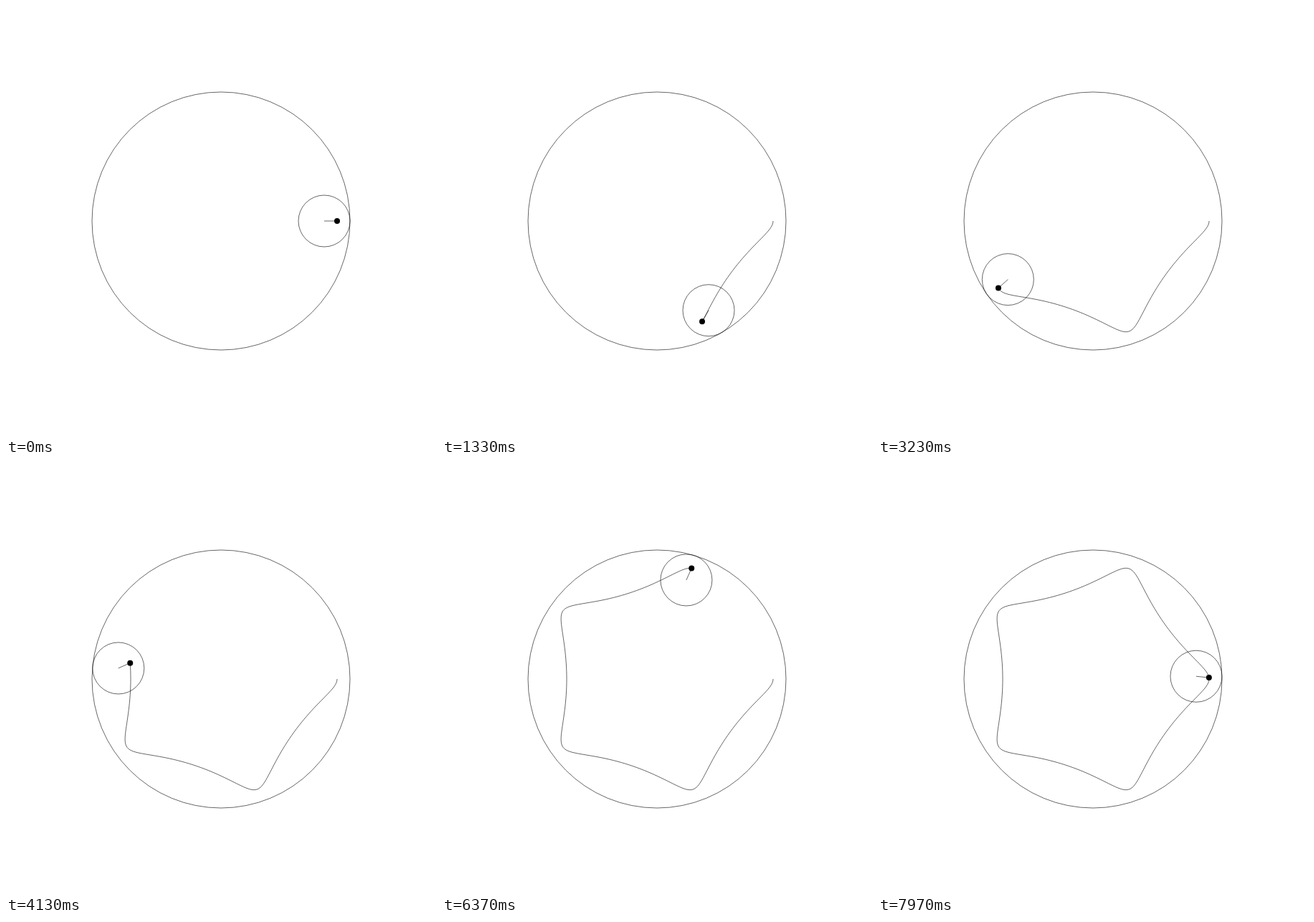
Recreate the animation shown at these times as an HTML page. Size 600 px wide and 600 px high, loop 8.01 s.

```html
<!DOCTYPE html>
<html lang="en">
<head>
<meta charset="utf-8">
<title>Hypotrochoid</title>
<style>
  html, body { margin: 0; width: 100%; height: 100%; overflow: hidden; background: #fff; }
  svg { display: block; width: 100%; height: 100%; }
  .line { fill: none; stroke: #000; stroke-width: 0.6; }
</style>
</head>
<body>
<svg viewBox="0 0 600 600">
  <circle class="line" cx="300" cy="300" r="180"/>
  <path class="line" id="trail"/>
  <circle class="line" id="wheel" r="36"/>
  <line class="line" id="arm"/>
  <circle id="pen" r="4"/>
</svg>
<script>
const LOOP = 8010, STEPS = 240;
const CENTER = 300, OUTER = 180, INNER = 36, ARM = 18;
const ORBIT = OUTER - INNER, SPIN = ORBIT / INNER;
const [trail, wheel, arm, pen] = ['trail', 'wheel', 'arm', 'pen'].map(id => document.getElementById(id));

const set = (el, attrs) => Object.entries(attrs).forEach(([k, v]) => el.setAttribute(k, v));

function pose(step) {
  const a = step / STEPS * 2 * Math.PI;
  const x = CENTER + ORBIT * Math.cos(a), y = CENTER + ORBIT * Math.sin(a);
  return { x, y, px: x + ARM * Math.cos(SPIN * a), py: y - ARM * Math.sin(SPIN * a) };
}

const points = Array.from({ length: STEPS }, (_, i) => {
  const { px, py } = pose(i);
  return px.toFixed(3) + ' ' + py.toFixed(3);
});

// 30 steps per second, with step times rounded to 10 ms
function stepAt(ms) {
  const ticks = Math.floor((ms % LOOP) / 10);
  return Math.min(STEPS - 1, Math.floor(0.3 * ticks + 0.15));
}

function draw(ms) {
  const step = stepAt(ms);
  const { x, y, px, py } = pose(step);
  set(trail, { d: 'M' + points.slice(0, step + 1).join('L') });
  set(wheel, { cx: x, cy: y });
  set(arm, { x1: x, y1: y, x2: px, y2: py });
  set(pen, { cx: px, cy: py });
}

const start = performance.now();
function tick() {
  draw(performance.now() - start);
  requestAnimationFrame(tick);
}
tick();
</script>
</body>
</html>
```
